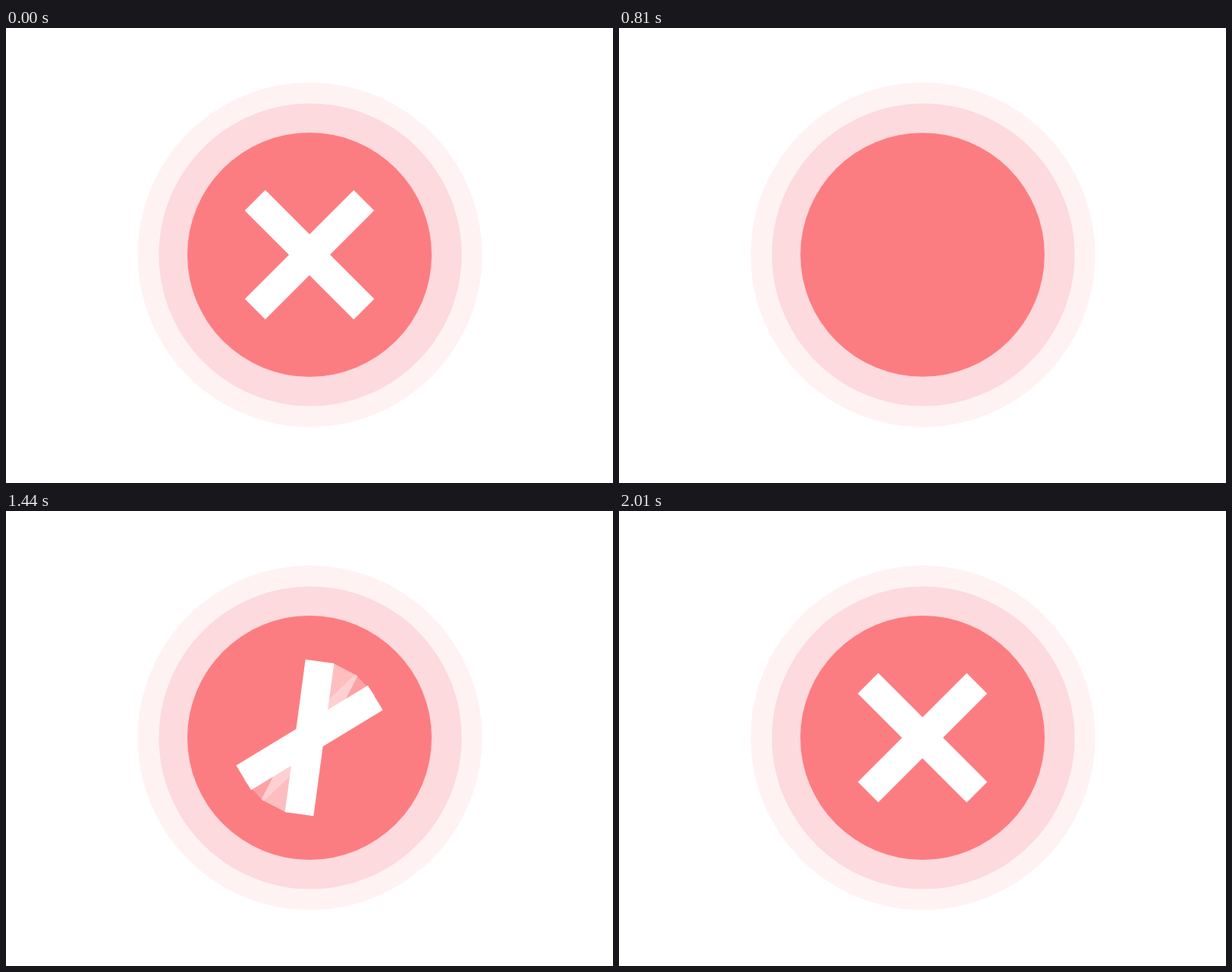
These frames come from a looping animation (800 px wide and 600 px high, 2250 ms). An HTML page with a canvas:

```html
<!DOCTYPE html>
<html lang="en">
<head>
<meta charset="utf-8">
<title>Error mark</title>
<style>
  html, body { margin: 0; width: 100%; height: 100%; overflow: hidden; background: #fff; }
  canvas { display: block; width: 800px; height: 600px; }
</style>
</head>
<body>
<canvas id="stage" width="800" height="600"></canvas>
<script>
const ctx = document.getElementById('stage').getContext('2d');
const LOOP = 2250, STEP = 30, RESET = 120;
const CENTER = { x: 400, y: 299 };
const BAR = { length: 203, thickness: 38 };
const OVERSHOOT = 10;

const DISCS = [
  { x: 400.5, radius: 227, color: '#fff2f3', start: 147 },
  { x: 401, radius: 199.5, color: '#fcdadd', start: 246 },
  { x: 400, radius: 161, color: '#fc7d81', start: 351 }
];
const GROW_TIME = 467;

function ease(t, start, duration) {
  const x = Math.min(1, Math.max(0, (t - start) / duration));
  return x * x * (3 - 2 * x);
}

// Swings counterclockwise past the resting angle, then settles back.
function swing(t, rest) {
  return -(rest + OVERSHOOT) * ease(t, 1260, 330) + OVERSHOOT * ease(t, 1590, 360);
}

function drawDisc({ x, radius, color, start }, t) {
  const r = radius * ease(t, start, GROW_TIME);
  if (r <= 0) return;
  ctx.fillStyle = color;
  ctx.beginPath();
  ctx.arc(x, CENTER.y, r, 0, Math.PI * 2);
  ctx.fill();
}

function drawBar(length, degrees, alpha = 1) {
  ctx.save();
  ctx.translate(CENTER.x, CENTER.y);
  ctx.rotate(degrees * Math.PI / 180);
  ctx.globalAlpha = alpha;
  ctx.fillStyle = '#fff';
  ctx.fillRect(-length / 2, -BAR.thickness / 2, length, BAR.thickness);
  ctx.restore();
}

function draw(t) {
  ctx.fillStyle = '#fff';
  ctx.fillRect(0, 0, 800, 600);
  for (const disc of DISCS) drawDisc(disc, t);

  const length = BAR.length * ease(t, 960, 300);
  if (length <= 0) return;
  drawBar(length, swing(t - 2 * STEP, 135), 0.28);
  drawBar(length, swing(t - STEP, 135), 0.5);
  drawBar(length, swing(t, 135));
  drawBar(length, swing(t, 45));
}

const origin = performance.now();
function tick() {
  const elapsed = (performance.now() - origin) % LOOP;
  const t = Math.floor(elapsed / STEP) * STEP;
  draw(t < RESET ? LOOP : t);
  requestAnimationFrame(tick);
}
tick();
</script>
</body>
</html>
```
